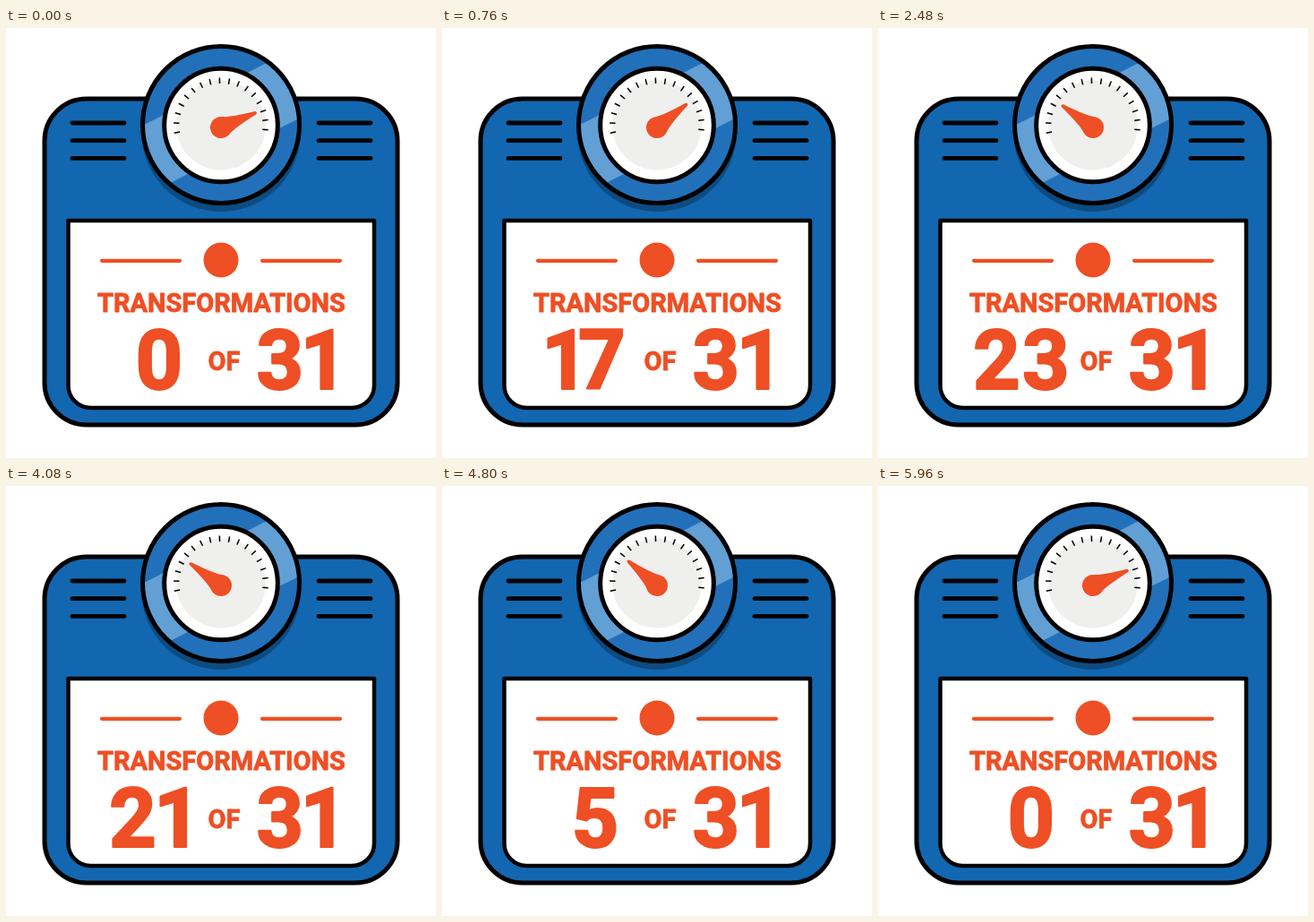
These frames come from a looping animation (480x480 px, 6000 ms). An HTML page with a canvas:

```html
<!DOCTYPE html>
<html lang="en">
<head>
<meta charset="utf-8">
<title>Transformations scale</title>
<style>
  html, body { margin: 0; width: 100%; height: 100%; overflow: hidden; background: #fff; }
  canvas { display: block; width: 480px; height: 480px; }
</style>
</head>
<body>
<canvas id="stage" width="480" height="480"></canvas>
<script>
const ctx = document.getElementById('stage').getContext('2d');
const LOOP = 6000, STEP = 40, GOAL = 23, COUNT_MS = 1040;
const INK = '#000', BLUE = '#1267b0', RING = '#2270b9', SHINE = '#629fd5',
      SHADE = '#0d4b80', ORANGE = '#ef4f24', FACE = '#efefee';
const RAD = Math.PI / 180;
const REST = 67, PEAK = -54.5; // needle angles, degrees from upright

// [start, end, easing, from, to]
const SWINGS = [
  [280, 1640, u => u * u, REST, PEAK],
  [4640, 6000, u => u * u * (3 - 2 * u), PEAK, REST]
];
const BLINKS = [2000, 2320, 3000, 3320];
const BLINK_MS = 160;

const clamp = u => Math.min(1, Math.max(0, u));

function needleAngle(t) {
  const [start, end, ease, from, to] = SWINGS[t < 3000 ? 0 : 1];
  return from + (to - from) * ease(clamp((t - start) / (end - start)));
}

function countAt(t) {
  const u = t < 3000 ? (t + STEP) / COUNT_MS : 1 - (t - 3999) / COUNT_MS;
  return Math.floor(GOAL * clamp(u) + 1e-6);
}

const isHidden = t => BLINKS.some(b => t >= b && t < b + BLINK_MS);

function paint(fill, stroke, width) {
  if (fill) { ctx.fillStyle = fill; ctx.fill(); }
  if (stroke) { ctx.strokeStyle = stroke; ctx.lineWidth = width; ctx.stroke(); }
}

function disc(x, y, r, fill, stroke, width) {
  ctx.beginPath();
  ctx.arc(x, y, r, 0, 2 * Math.PI);
  paint(fill, stroke, width);
}

function box(x, y, w, h, radii, fill, width) {
  ctx.beginPath();
  ctx.roundRect(x, y, w, h, radii);
  paint(fill, INK, width);
}

function line(x1, y1, x2, y2, color, width, cap = 'round') {
  ctx.beginPath();
  ctx.moveTo(x1, y1);
  ctx.lineTo(x2, y2);
  ctx.lineCap = cap;
  paint(null, color, width);
}

function setFont(size, outline) {
  ctx.font = `700 ${size}px Roboto, sans-serif`;
  ctx.fillStyle = ctx.strokeStyle = ORANGE;
  ctx.lineWidth = outline;
  ctx.lineJoin = 'round';
}

function print(text, x, y) {
  ctx.fillText(text, x, y);
  ctx.strokeText(text, x, y);
}

// Centres the visible ink of a word on cx.
function word(text, cx, y, size) {
  setFont(size, 0.8);
  const m = ctx.measureText(text);
  print(text, cx - (m.actualBoundingBoxRight - m.actualBoundingBoxLeft) / 2, y);
}

// Sets digits with an even gap between their visible edges.
function digits(value, cx, y) {
  const gap = 7;
  setFont(92, 2.2);
  const glyphs = [...String(value)].map(ch => {
    const m = ctx.measureText(ch);
    return { ch, left: m.actualBoundingBoxLeft, width: m.actualBoundingBoxLeft + m.actualBoundingBoxRight };
  });
  let x = cx - glyphs.reduce((sum, g) => sum + g.width + gap, -gap) / 2;
  for (const g of glyphs) {
    print(g.ch, x + g.left, y);
    x += g.width + gap;
  }
}

function drawBody() {
  box(43, 79, 394, 364, 47, BLUE, 5);
  ctx.save();
  ctx.beginPath();
  ctx.rect(46, 81.5, 388, 128);
  ctx.clip();
  disc(240, 116, 89, SHADE);
  ctx.restore();
  for (const y of [106, 125.7, 145.4]) {
    line(74, y, 132, y, INK, 4.8);
    line(349, y, 407, y, INK, 4.8);
  }
  box(69.5, 215, 341.5, 209, [0, 0, 25, 25], '#fff', 4.5);
}

function drawDial(angle) {
  ctx.save();
  disc(240, 108, 87.5, RING);
  ctx.clip();
  ctx.beginPath();
  ctx.moveTo(140, 115);
  ctx.lineTo(310, 29.5);
  ctx.lineTo(345, 92);
  ctx.lineTo(160, 184.5);
  paint(SHINE);
  ctx.restore();
  disc(240, 108, 87.5, null, INK, 5);
  disc(240, 108.5, 63.3, '#fff', INK, 5);
  disc(240, 108.5, 50, FACE);

  for (let i = -8; i <= 8; i++) {
    const a = (i * 12.2 - 1.8) * RAD, s = Math.sin(a), c = Math.cos(a);
    line(240 + 46.5 * s, 108.5 - 46.5 * c, 240 + 53 * s, 108.5 - 53 * c, INK, 1.5, 'butt');
  }

  ctx.save();
  ctx.translate(240, 111);
  ctx.rotate(angle * RAD);
  disc(0, 0, 12, ORANGE);
  ctx.beginPath();
  ctx.moveTo(-10.5, -5.5);
  ctx.quadraticCurveTo(-6.5, -13, -1.7, -42);
  ctx.quadraticCurveTo(0, -44.5, 1.7, -42);
  ctx.quadraticCurveTo(6.5, -13, 10.5, -5.5);
  paint(ORANGE);
  ctx.restore();
}

function drawPanel(t) {
  line(107, 259.8, 194, 259.8, ORANGE, 4.2);
  line(286, 259.8, 373, 259.8, ORANGE, 4.2);
  disc(240, 259, 19.5, ORANGE);
  word('TRANSFORMATIONS', 240, 316.5, 29);
  word('OF', 244, 382, 29);
  digits(31, 323, 403);
  if (!isHidden(t)) {
    const n = countAt(t);
    digits(n, n < 10 ? 171 : 159.5, 403);
  }
}

function draw(now) {
  const t = Math.floor((now % LOOP) / STEP) * STEP;
  ctx.clearRect(0, 0, 480, 480);
  drawBody();
  drawDial(needleAngle(t));
  drawPanel(t);
}

let origin;
function tick(now) {
  origin ??= now;
  draw(now - origin);
  requestAnimationFrame(tick);
}
draw(0);
requestAnimationFrame(tick);
</script>
</body>
</html>
```
